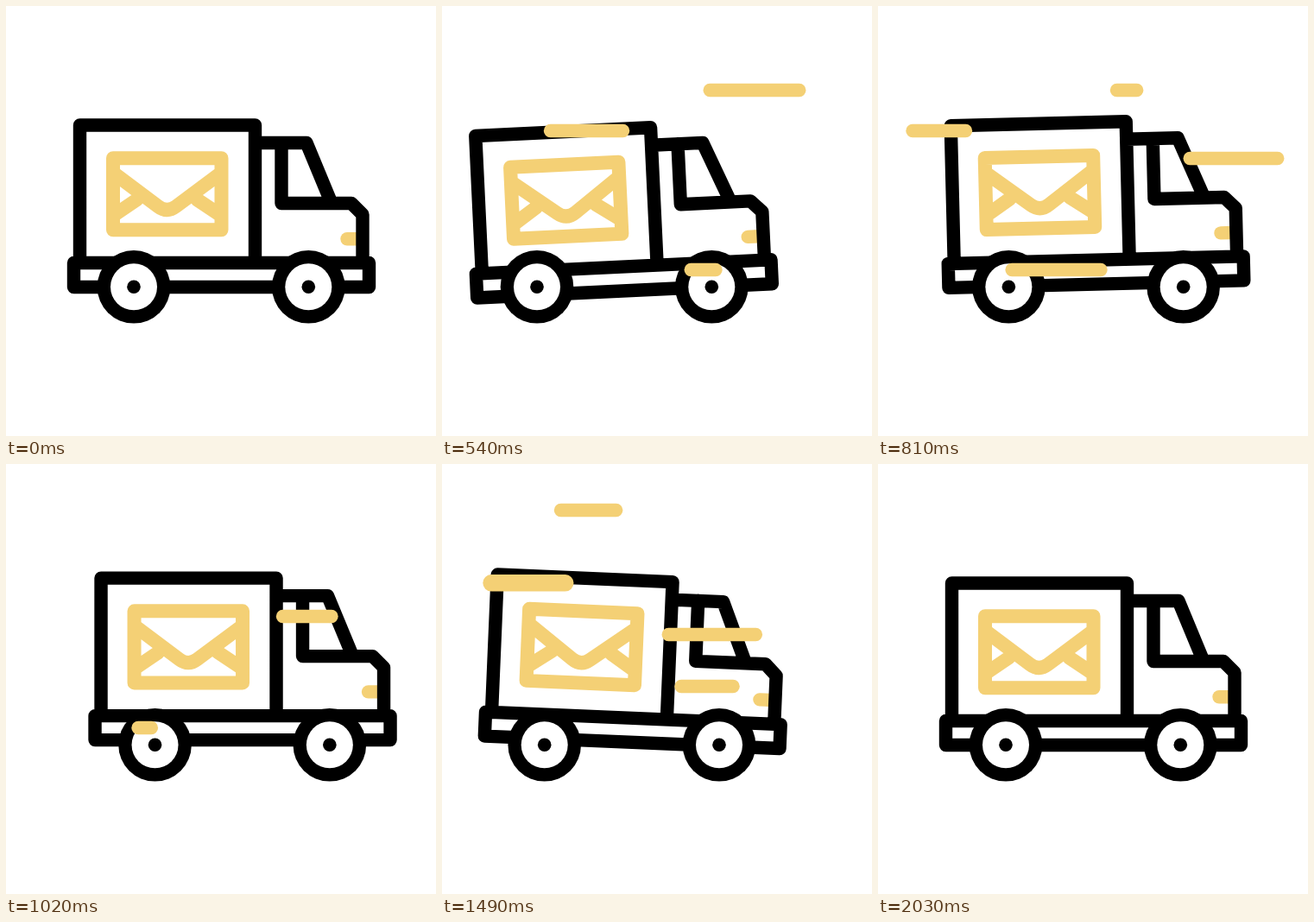
Write an HTML page with a canvas that moves like this. It is 498 by 498 pixels and loops after 2.09 s.

```html
<!DOCTYPE html>
<html lang="en">
<head>
<meta charset="utf-8">
<title>Delivery truck</title>
<style>
  html, body { margin: 0; width: 100%; height: 100%; overflow: hidden; background: #fff; }
  canvas { display: block; width: 498px; height: 498px; }
</style>
</head>
<body>
<canvas id="stage" width="498" height="498"></canvas>
<script>
const ctx = document.getElementById('stage').getContext('2d');
const BLACK = '#000', YELLOW = '#f4d075', WHITE = '#fff';
const LOOP = 2090, STEP = 67.5, LAST = 30, LINE = 15.4;

// A streak's head runs left first, then its tail catches up (in steps)
const HEAD_TIME = 6, TAIL_LAG = 2.6, TAIL_TIME = 7.4;

const body = new Path2D(
  'M78.5 297.5H420.5V325.5H78.5Z' +
  'M85.5 297.5V138H288.5V297.5' +
  'M288.5 158.5H348L377 228.5' +
  'M319 158.5V228.5H400L413 241.5V297.5');
const envelope = new Path2D(
  'M124 176.2H249.5V259.3H124Z' +
  'M124 193L176 232Q186.5 240 197 232L249.5 193' +
  'M124 243L152 224M249.5 243L221 224');
const lamp = new Path2D('M395 269.8H407');

function ease(u, a, b) {
  const t = Math.min(1, Math.max(0, (u - a) / (b - a)));
  return t * t * (3 - 2 * t);
}

// Rises from 0 to 1 between a and b, falls back between b and c
const hump = (u, a, b, c) => ease(u, a, b) - ease(u, b, c);

const drift = u =>
  -38 * hump(u, 1.4, 8, 14.6) + 25 * hump(u, 8, 14.6, 22) - 29.3 * hump(u, 14.6, 22, LAST);

const bounce = u =>
  7.4 * hump(u, 0, 5, 14.8) - 6 * hump(u, 5, 14.8, 18.5) +
  6.5 * hump(u, 14.8, 18.5, 24) - 7.3 * hump(u, 18.5, 24, LAST);

const tilt = u => -2.85 * hump(u, 1, 9, 15) + 2.6 * hump(u, 15, 20.5, LAST);

function disc(x, y, r, color) {
  ctx.fillStyle = color;
  ctx.beginPath();
  ctx.arc(x, y, r, 0, Math.PI * 2);
  ctx.fill();
}

function strokePath(path, color, width = LINE) {
  ctx.strokeStyle = color;
  ctx.lineWidth = width;
  ctx.stroke(path);
}

function drawTruck(u) {
  const dx = drift(u);
  ctx.save();
  ctx.translate(250 + dx, 325 + bounce(u));
  ctx.rotate(tilt(u) * Math.PI / 180);
  ctx.translate(-250, -325);
  strokePath(envelope, YELLOW, 16);
  strokePath(lamp, YELLOW);
  strokePath(body, BLACK);
  ctx.restore();
  for (const x of [148, 350.3]) {
    disc(x + dx, 325.3, 42.3, BLACK);
    disc(x + dx, 325.3, 27, WHITE);
    disc(x + dx, 325.3, 7.8, BLACK);
  }
}

function streak(u, start, y, right, length, width = LINE) {
  const lag = start + TAIL_LAG;
  const head = right - length * ease(u, start, start + HEAD_TIME);
  const tail = right - length * ease(u, lag, lag + TAIL_TIME);
  if (tail - head < 0.8) return;
  const path = new Path2D();
  path.moveTo(head, y);
  path.lineTo(tail, y);
  strokePath(path, YELLOW, width);
}

function drawWind(u) {
  streak(u, 3.8, 97.5, 432.5, 156);
  streak(u, 5, 144.5, 211, 171);
  streak(u, 6.4, 305.5, 317, 164);
  streak(u, 8, 176.5, 477.5, 157);

  streak(u, 14.9, 53.5, 326, 188.5);
  streak(u, 15, 257.5, 444, 167);
  streak(u, 16, 137.8, 210, 153, 19.4);
  streak(u, 18.7, 197.5, 368, 184);
}

function draw(ms) {
  const u = Math.min(LAST, Math.floor((ms % LOOP) / STEP));
  ctx.fillStyle = WHITE;
  ctx.fillRect(0, 0, 498, 498);
  ctx.lineCap = ctx.lineJoin = 'round';
  drawTruck(u);
  drawWind(u);
}

const start = performance.now();
function tick() {
  draw(performance.now() - start);
  requestAnimationFrame(tick);
}
tick();
</script>
</body>
</html>
```
